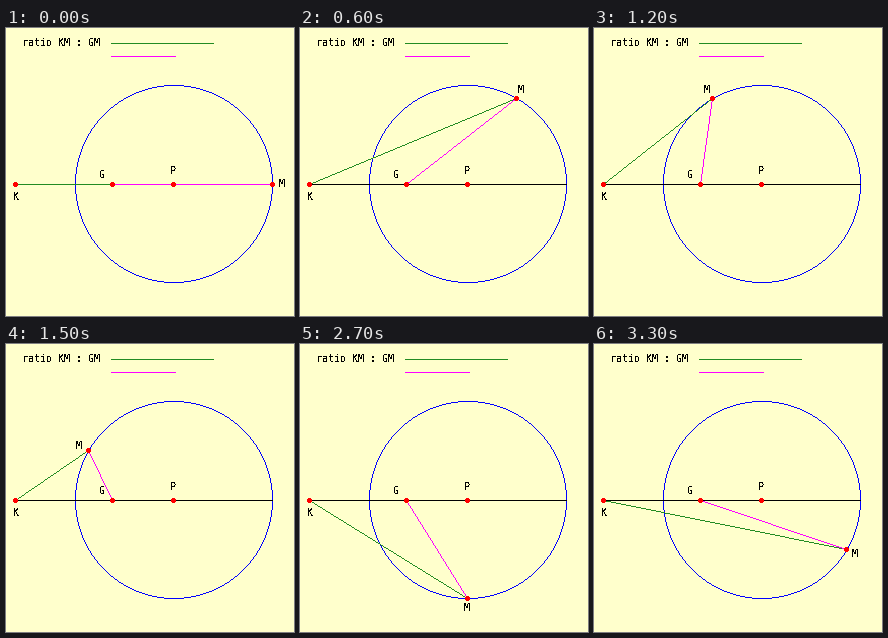
Recreate the animation shown at these times as a matplotlib script. Size 288 px wide and 288 px high, loop 3.6 s.

```python
import math

import matplotlib.pyplot as plt
import numpy as np
from matplotlib.animation import FuncAnimation
from matplotlib.transforms import IdentityTransform

SIZE, DPI = 288, 72
STEPS, STEP_MS = 12, 300
CREAM, BLUE, BLACK = (255, 255, 204), (0, 0, 255), (0, 0, 0)
GREEN, MAGENTA, RED = (34, 139, 34), (255, 0, 255), (255, 0, 0)
K, G, P = (9, 156), (106, 156), (167, 156)
CX, CY, R = 167.5, 155.5, 98.5

plt.rcParams["text.antialiased"] = False
plt.rcParams["font.family"] = "DejaVu Sans Mono"

fig = plt.figure(figsize=(SIZE / DPI, SIZE / DPI), dpi=DPI)


def line(img, a, b, color):
    """One-pixel line without smoothing."""
    n = max(abs(b[0] - a[0]), abs(b[1] - a[1])) + 1
    x = np.floor(np.linspace(a[0], b[0], n) + 0.5).astype(int)
    y = np.floor(np.linspace(a[1], b[1], n) + 0.5).astype(int)
    img[y, x] = color


def circle(img, color):
    """One-pixel circle built from its four flat arcs."""
    half = int(R / math.sqrt(2))
    along = np.arange(-half - 0.5, half + 1)
    out = np.floor(np.sqrt(R * R - along * along)) + 0.5
    for sign in (-1, 1):
        for dx, dy in ((along, sign * out), (sign * out, along)):
            img[(CY + dy).astype(int), (CX + dx).astype(int)] = color


def dot(img, center):
    for dy in range(-2, 3):
        for dx in range(-2, 3):
            if dx * dx + dy * dy <= 5:
                img[center[1] + dy, center[0] + dx] = RED


def label(left, base, text):
    return fig.text(left, SIZE - base, text, size=10, ha="left",
                    va="baseline", color="black",
                    transform=IdentityTransform())


base_img = np.full((SIZE, SIZE, 3), CREAM, dtype=np.uint8)
line(base_img, (105, 15), (207, 15), GREEN)
line(base_img, (105, 28), (169, 28), MAGENTA)
circle(base_img, BLUE)
line(base_img, K, (266, 156), BLACK)

picture = fig.figimage(base_img, origin="upper")
label(16, 18, "ratio KM : GM")
label(7, 172, "K")
label(94, 150, "G")
label(164, 146, "P")
m_label = label(0, 0, "M")


def update(i):
    t = 2 * math.pi * i / STEPS
    c, s = round(math.cos(t), 9), round(math.sin(t), 9)
    m = (math.floor(CX + R * c), math.floor(CY - R * s + 0.5))
    img = base_img.copy()
    line(img, K, m, GREEN)
    line(img, G, m, MAGENTA)
    for point in (K, G, P, m):
        dot(img, point)
    picture.set_data(img)
    m_label.set_position((round(164 + 109 * c), SIZE - 159 - round(-108.5 * s)))
    return picture, m_label


anim = FuncAnimation(fig, update, frames=STEPS, interval=STEP_MS,
                     repeat=True, repeat_delay=0, blit=False)
plt.show()
```
